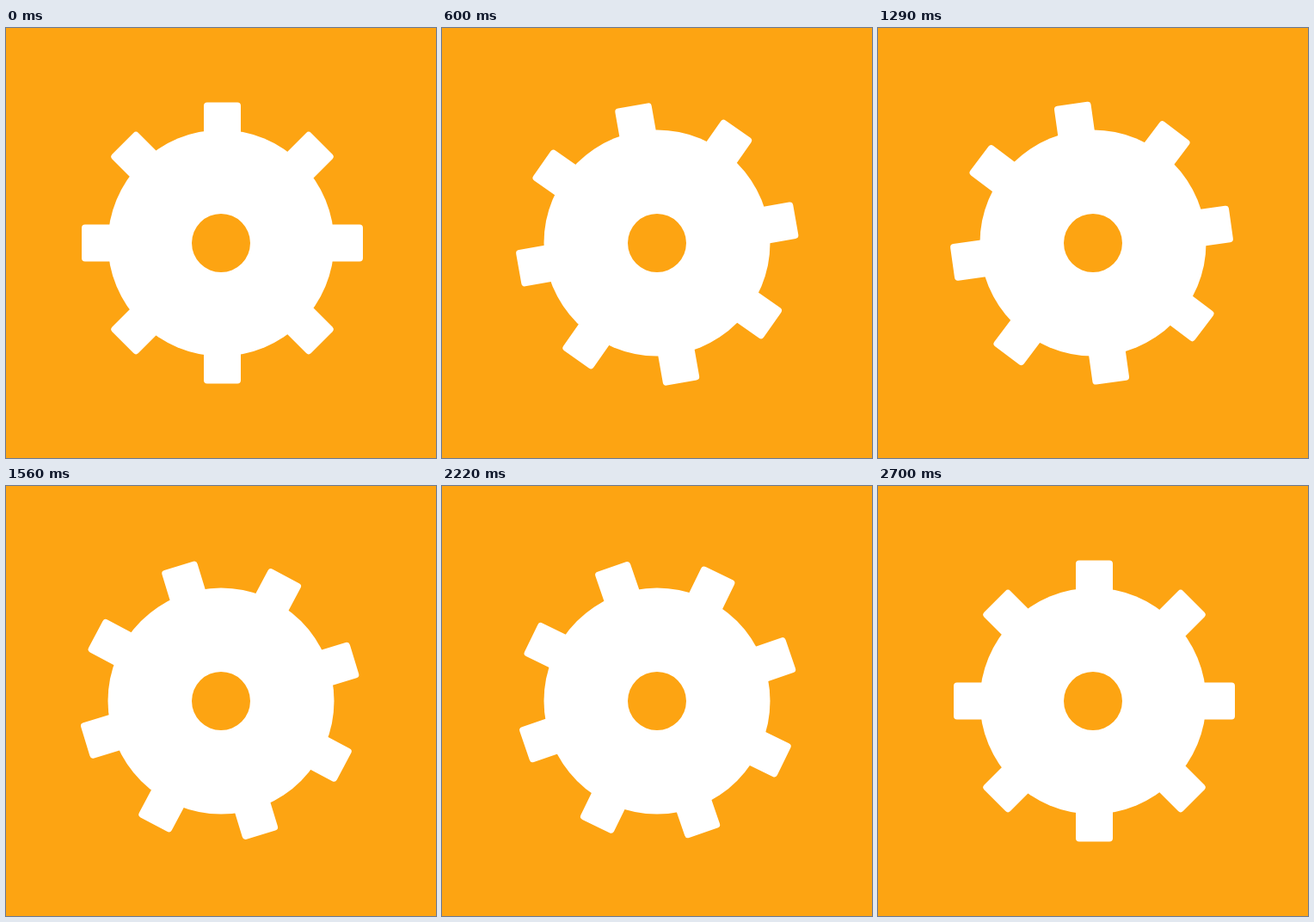
Animation, 500 px wide and 500 px high, one loop 2.79 s. Source, as an HTML page with a canvas:

```html
<!DOCTYPE html>
<html lang="en">
<head>
<meta charset="utf-8">
<title>Turning gear</title>
<style>
  html, body { margin: 0; width: 100%; height: 100%; overflow: hidden; background: #fda412; }
  canvas { display: block; }
</style>
</head>
<body>
<canvas id="stage" width="500" height="500"></canvas>
<script>
const ctx = document.getElementById('stage').getContext('2d');
const ORANGE = '#fda412';
const WHITE = '#ffffff';
const STEP_MS = 30;
const STEPS = 90;
const LOOP_MS = 2790;
const CENTER = 250;
const BAR = { length: 327, width: 43, radius: 4, shift: 1.5 };

function disc(radius, color) {
  ctx.fillStyle = color;
  ctx.beginPath();
  ctx.arc(0, 0, radius, 0, Math.PI * 2);
  ctx.fill();
}

// Four crossed bars make the eight teeth; they sit slightly off the axle.
function teeth(angle) {
  ctx.save();
  ctx.rotate(angle);
  ctx.translate(BAR.shift, 0);
  ctx.fillStyle = WHITE;
  for (let i = 0; i < 4; i++) {
    ctx.beginPath();
    ctx.roundRect(-BAR.width / 2, -BAR.length / 2, BAR.width, BAR.length, BAR.radius);
    ctx.fill();
    ctx.rotate(Math.PI / 4);
  }
  ctx.restore();
}

function draw(time) {
  const step = Math.min(Math.floor((time % LOOP_MS + 0.01) / STEP_MS), STEPS);
  ctx.setTransform(1, 0, 0, 1, 0, 0);
  ctx.fillStyle = ORANGE;
  ctx.fillRect(0, 0, 500, 500);
  ctx.translate(CENTER, CENTER);
  teeth(step / STEPS * Math.PI * 2);
  disc(131.5, WHITE);
  disc(34, ORANGE);
}

const start = performance.now();
function tick() {
  draw(performance.now() - start);
  requestAnimationFrame(tick);
}
tick();
</script>
</body>
</html>
```
